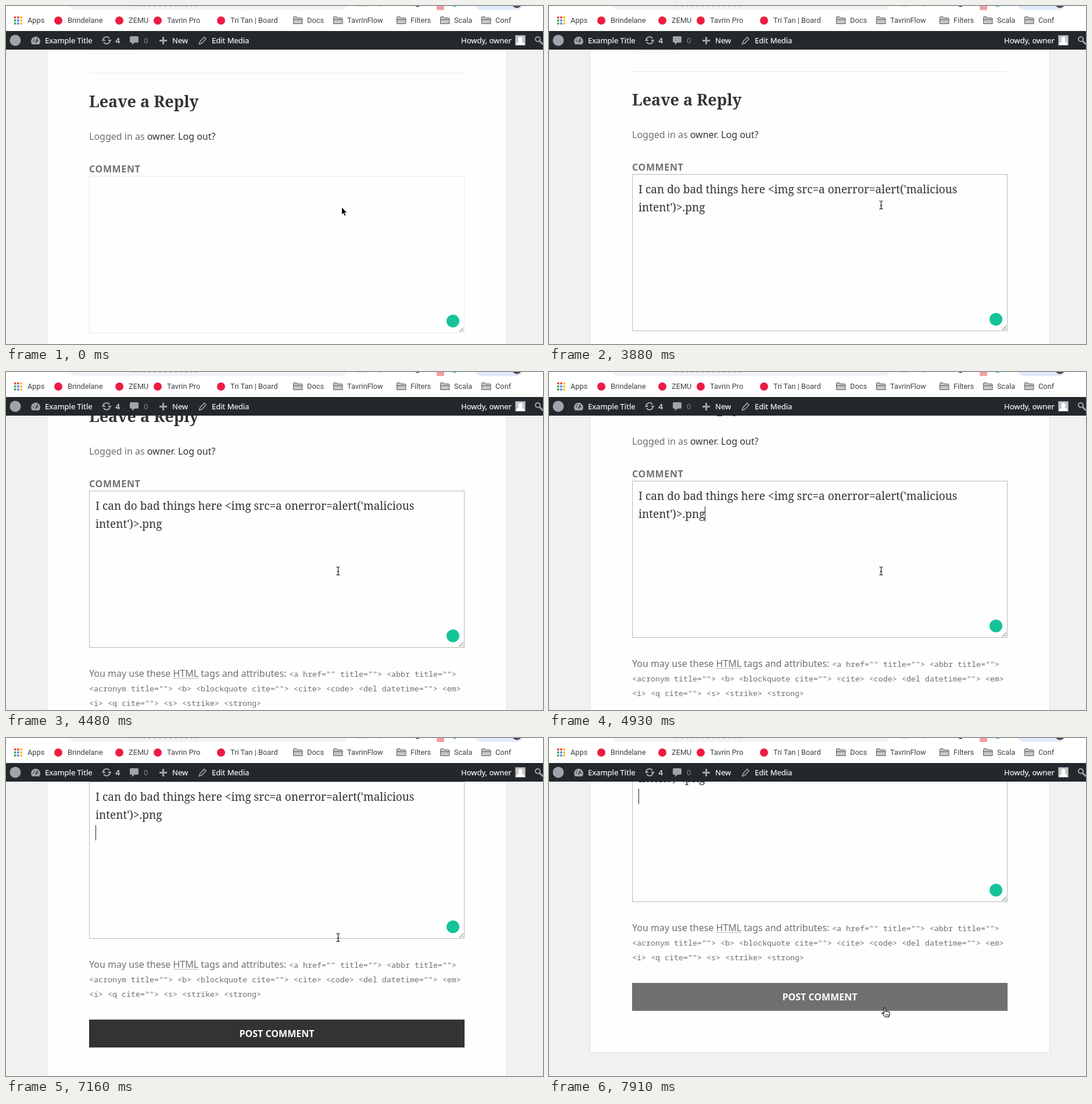
These frames come from a looping animation (924 px wide and 581 px high, 8000 ms). An HTML page:

```html
<!DOCTYPE html>
<html lang="en">
<head>
<meta charset="utf-8">
<title>Leave a Reply</title>
<style>
html, body { margin: 0; width: 100%; height: 100%; overflow: hidden; background: #f1f1f1; }
svg { display: block; width: 100%; height: 100%; }
text { white-space: pre; }
.mark { font: 12.8px Roboto, sans-serif; fill: #3c4043; }
.bar { font: 13px "Noto Sans", sans-serif; fill: #eee; stroke: #eee; stroke-width: .25px; }
.body { font: 16px "Noto Sans", sans-serif; fill: #707070; }
.link { fill: #333; }
.bold { font-weight: 700; }
.title { font: 700 27px "Noto Serif", serif; fill: #333; }
.typed { font: 19px "Noto Serif", serif; fill: #333; }
.code { font: 13.333px "Noto Sans Mono", monospace; fill: #707070; }
</style>
</head>
<body>
<svg viewBox="0 0 924 581">
  <rect width="924" height="581" fill="#f1f1f1"/>
  <g id="page">
    <rect x="70.5" y="-20" width="791" height="840.5" fill="#fefefe" stroke="#000" stroke-opacity=".09"/>
    <path d="M143.5 60V82.5H220.5V60M143 115.5H789" fill="none" stroke="#eaeaea"/>
    <text class="title" x="143" y="174">Leave a Reply</text>
    <text class="body" x="143" y="230">Logged in as <tspan class="link">owner</tspan>. <tspan class="link">Log out?</tspan></text>
    <text class="body bold" x="143" y="286" letter-spacing=".64">COMMENT</text>
    <rect id="field" x="143.5" y="292.5" width="645" height="269" fill="#fefefe"/>
    <g id="typed" class="typed">
      <text x="154" y="325">I can do bad things here &lt;img src=a onerror=alert('malicious</text>
      <text x="154" y="356">intent')&gt;.png</text>
    </g>
    <rect id="caret" width="1" height="26" fill="#222"/>
    <circle id="badge" cx="769" cy="541.5" r="11" fill="#15c39a"/>
    <circle id="spin" cx="769" cy="541.5" r="9.5" fill="none" stroke="#15c39a" stroke-width="2" stroke-dasharray="42 18"/>
    <path d="M780 560L787 553M784.5 560L787 557.5" stroke="#555"/>
    <text class="body" x="143" y="612">You may use these HTML tags and attributes:</text>
    <path d="M288 614.5H331" stroke="#707070" stroke-width="1.2" stroke-dasharray="1 1"/>
    <g class="code">
      <text x="487" y="612">&lt;a href="" title=""&gt; &lt;abbr title=""&gt;</text>
      <text x="143" y="637">&lt;acronym title=""&gt; &lt;b&gt; &lt;blockquote cite=""&gt; &lt;cite&gt; &lt;code&gt; &lt;del datetime=""&gt; &lt;em&gt;</text>
      <text x="143" y="662">&lt;i&gt; &lt;q cite=""&gt; &lt;s&gt; &lt;strike&gt; &lt;strong&gt;</text>
    </g>
    <rect id="post" x="143" y="701" width="646" height="48"/>
    <text class="body bold" x="466" y="731" text-anchor="middle" style="fill:#fff">POST COMMENT</text>
  </g>

  <rect width="924" height="43" fill="#fff"/>
  <rect x="108" y="-20" width="480" height="27" rx="13" fill="#f1f3f4"/>
  <path d="M219 .5H330" stroke="#9a9da0" stroke-dasharray="2 7"/>
  <rect x="603" y="-6" width="18" height="7" rx="3" fill="#ddd"/>
  <circle cx="644" cy="-4" r="5" fill="#ccc"/>
  <circle cx="708" cy="-4" r="5.5" fill="#1d1d4f"/>
  <rect x="741" y="-4" width="13" height="11" rx="2" fill="#f2a0a4"/>
  <circle cx="772" cy="-4" r="5.5" fill="#15c39a"/>
  <rect x="806" y="-20" width="84" height="27" rx="13" fill="#e2eafc"/>
  <circle cx="879" cy="-5" r="8.5" fill="#4a4a4a"/>
  <g id="marks" class="mark"></g>

  <rect y="43" width="924" height="32" fill="#23282d"/>
  <g fill="#a0a5aa">
    <circle cx="16" cy="59" r="9.5"/>
    <path d="M45 66A8 8 0 1 1 57 66Z"/>
    <path d="M213 54q0-2 2-2h11q2 0 2 2v7q0 2-2 2h-5l-4 4v-4h-2q-2 0-2-2z"/>
    <path d="M269 53h3v5h5v3h-5v5h-3v-5h-5v-3h5z"/>
  </g>
  <g fill="none" stroke="#a0a5aa" stroke-width="2">
    <path d="M167 58A6 6 0 0 1 178 56M179 60A6 6 0 0 1 168 62"/>
    <path d="M332.5 65.5L334 61L341 53.5L344 56.5L337 64Z" stroke-width="1.6"/>
    <circle cx="915" cy="57" r="4"/>
    <path d="M918 60L924 66" stroke-width="3"/>
  </g>
  <path d="M175 58h7l-3.500 4zM164.500 60h7l-3.500-4z" fill="#a0a5aa"/>
  <path d="M51 63L54 56M46.500 60h2M53.500 60h2M48 56l1 1" stroke="#23282d" stroke-width="1.500"/>
  <g class="bar">
    <text x="67" y="64">Example Title</text>
    <text x="188.500" y="64">4</text>
    <text x="237" y="64" style="fill:#82878c;stroke:none">0</text>
    <text x="286" y="64">New</text>
    <text x="354" y="64">Edit Media</text>
    <text x="783" y="64">Howdy, owner</text>
  </g>
  <rect x="876.500" y="50.500" width="17" height="17" fill="#c5c5c5" stroke="#82878c"/>
  <path d="M878 67q0-5 5-5.500h4q5 .5 5 5.500z" fill="#fff"/>
  <ellipse cx="885" cy="57.500" rx="3.600" ry="4.500" fill="#fff"/>

  <g id="arrow"><path d="M.5 .5V14L3.500 11.200L5.700 16.200L8 15.200L5.900 10.300H10Z" fill="#000" stroke="#fff"/></g>
  <g id="beam" fill="none">
    <path d="M-3-7Q0-7 0-5Q0-7 3-7M0-5V5M-3 7Q0 7 0 5Q0 7 3 7M-2 1H2" stroke="#fff" stroke-width="3" opacity=".7"/>
    <path d="M-3-7Q0-7 0-5Q0-7 3-7M0-5V5M-3 7Q0 7 0 5Q0 7 3 7M-2 1H2" stroke="#111" stroke-width="1.100"/>
  </g>
  <g id="hand">
    <path d="M4.500 9V2.200a1.300 1.300 0 0 1 2.600 0V7q1.300-1 2.400 .3q1.400-.8 2.300 .5q2-.5 2.200 1.200v3.500l-1.500 4H6.500L1 10.500q-.6-1.800 1.200-1.600l2.300 2z" fill="#fff" stroke="#000" stroke-width="1.100" stroke-linejoin="round"/>
    <path d="M7.700 11.500v3M9.700 11.500v3M11.700 11.500v3" stroke="#000" stroke-width=".8"/>
  </g>
</svg>
<script>
const $ = id => document.getElementById(id);
const LOOP = 8000, STEP = 150;

// Bookmarks bar
const label = (x, s) => `<text x="${x}" y="29">${s}</text>`;
const dot = ([x, s]) => `<circle cx="${x}" cy="25" r="7" fill="#ed1c40"/>` + label(x + 16, s);
const folder = ([x, s]) =>
  `<path d="M${x + .5} 30.500V20q0-1.500 1.500-1.500h4l1.500 2h7q1.500 0 1.500 1.500v8.500zM${x + .5} 23.500h15.500" fill="#c6c6c6" stroke="#5b5b5b"/>` + label(x + 24, s);
const hues = ['#ea4335', '#ea4335', '#fbbc05', '#34a853', '#4285f4', '#fbbc05', '#34a853', '#4285f4', '#fbbc05'];
$('marks').innerHTML =
  hues.map((c, i) => `<rect x="${14 + i % 3 * 5.200}" y="${18 + (i / 3 | 0) * 5.200}" width="3.400" height="3.400" fill="${c}"/>`).join('') +
  label(37, 'Apps') +
  [[90, 'Brindelane'], [195, 'ZEMU'], [261, 'Tavrin Pro'], [370, 'Tri Tan | Board']].map(dot).join('') +
  [[494, 'Docs'], [563, 'TavrinFlow'], [672, 'Filters'], [747, 'Scala'], [818, 'Conf']].map(folder).join('');

const lastOf = (list, t) => list.filter(k => (k[0] ?? k) <= t).pop();
const ease = (t, start, len) => {
  const p = Math.min(1, Math.max(0, (t - start) / len));
  return p * p * (3 - 2 * p);
};
const show = (id, on) => $(id).setAttribute('display', on ? 'inline' : 'none');

const ticks = [0, 140, 2980, 5670, 6860];
const snap = t => {
  const base = lastOf(ticks, t);
  return base + Math.floor((t - base) / STEP) * STEP;
};

const FOCUS = 590, PASTE = 1940, ENTER = 5670, HOVER = 7610;
const blinks = [FOCUS, 1040, 1490, 2540, 2980, 3430, 4030, 4480, 4930, 5530, ENTER, 6270, 6720, 7310, 7760];
const pointer = [
  [0, 'arrow', 577, 345], [140, 'beam', 575, 344], [290, 'beam', 572.5, 343], [440, 'beam', 571.5, 342],
  [6720, 'beam', 571.5, 343], [7460, 'arrow', 575, 388], [HOVER, 'hand', 580, 445],
  [7760, 'hand', 576, 469], [7910, 'hand', 572, 463]
];

function draw(time) {
  const t = snap(time);
  const scroll = Math.round(105 * ease(t, 3787, 930) + 175 * ease(t, 6860, 504));
  $('page').setAttribute('transform', `translate(0 ${-scroll})`);

  $('field').setAttribute('stroke', t < FOCUS ? '#e8e8e8' : '#b8b8b8');
  show('typed', t >= PASTE);
  const line = t < PASTE ? 0 : t < ENTER ? 1 : 2;
  show('caret', blinks.filter(b => b <= t).length % 2);
  $('caret').setAttribute('x', line === 1 ? 268 : 154);
  $('caret').setAttribute('y', 305 + line * 31);

  const busy = t > PASTE && t < 2690;
  show('badge', !busy);
  show('spin', busy);
  $('spin').setAttribute('transform', `rotate(${t * .6 % 360} 769 541.5)`);

  $('post').setAttribute('fill', t < HOVER ? '#333' : '#707070');
  const [, kind, x, y] = lastOf(pointer, t);
  for (const id of ['arrow', 'beam', 'hand']) show(id, id === kind);
  $(kind).setAttribute('transform', `translate(${x} ${y})`);
}

const begin = performance.now();
function loop() {
  draw((performance.now() - begin) % LOOP);
  requestAnimationFrame(loop);
}
loop();
</script>
</body>
</html>
```
